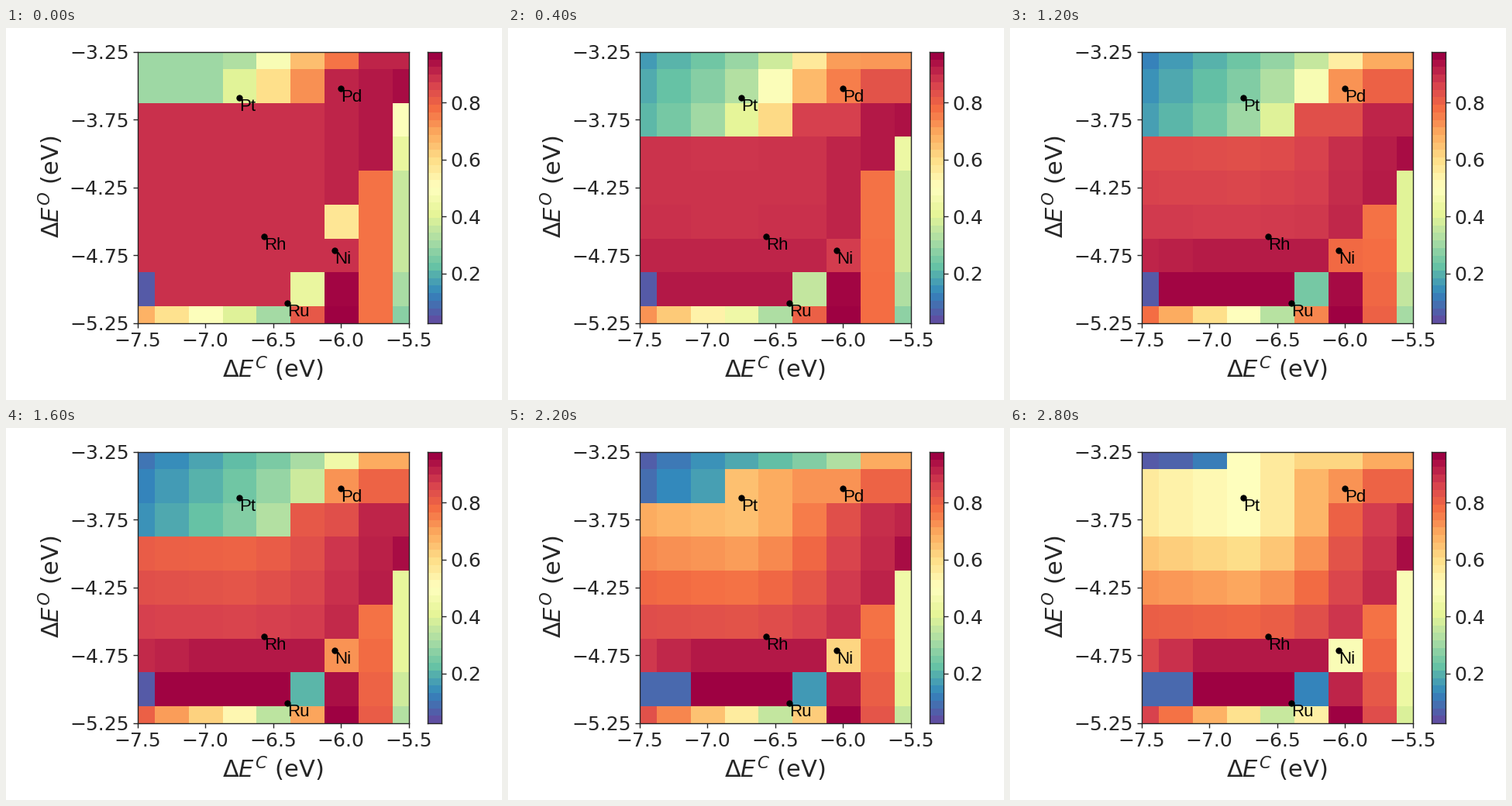
These frames come from a looping animation (640 by 480 pixels, 3000 ms). A matplotlib script:

```python
import numpy as np
import matplotlib.pyplot as plt
from matplotlib.animation import FuncAnimation

W, H, DPI = 640, 480, 100
FRAMES, STEP = 15, 200
N = 9
INK = "#262626"
LOW, HIGH = 0.0257, 0.978

plt.rcParams.update({
    "font.family": "DejaVu Sans",
    "mathtext.fontset": "dejavusans",
    "text.color": INK,
    "axes.edgecolor": INK,
    "axes.linewidth": 1.0,
    "xtick.color": INK,
    "ytick.color": INK,
})

row, col = np.mgrid[0:N, 0:N]


def plateau(t, u):
    """Red region: sags towards the upper left, deepens in lower rows."""
    base = 92 + 2 * np.maximum(col - 5, 0)
    rise = 4 * np.maximum(row - 5, 0) * (1 - np.exp(-t / 3))
    depth = 10.5 * np.clip(6 - row, 0, 4)
    sag = np.interp(col, [0, 3, 4, 6, 8], [0.85, 1, 0.85, 0.28, 0])
    droop = 4 * np.maximum(2 - col, 0) * (row == 6)
    cap = 70 + 12 * row - 8 * (col < 7) + 24 * np.exp(-t)
    return np.minimum(base + rise - (depth * sag + droop) * u**2, cap)


def basin(t):
    """Blue-green region: one profile sliding to the right."""
    s = np.maximum(col + 0.6 * row + 1.2 - 0.27 * t, 3.8 - 3 * t)
    return np.interp(s, [-2, 0, 3, 4.5, 6, 7, 9], [2, 11, 23, 33, 64, 77, 96])


def levels(t):
    """Cell levels at frame t, in percent of the colour scale."""
    u = t / (FRAMES - 1)
    z = plateau(t, u)

    # The basin is a wedge whose rows flip to the plateau from below.
    flip = 13.2 - 2.2 * row + (col < 3)
    wedge = (row < 2 + (t >= 1)) & (col < 7 - row) & (t < flip)
    z = np.where(wedge, basin(t), z)

    # Right-hand strips retreat downwards in steps.
    orange = (col == 7) & (row >= 4 + (t >= 3))
    z = np.where(orange, 79 + 2.5 * np.maximum(row - 5, 0) * u, z)
    green = (col == 8) & (row >= 2 + (t >= 1) + (t >= 6))
    z = np.where(green, 35 + 13 * u**1.3 - 5 * np.maximum(row - 6, 0)
                 + 7 * np.maximum(4 - row, 0), z)

    # Bottom row: a ramp that warms up on the left.
    ramp = 69 - 10 * col + 20 * u**0.7 * np.clip(4.3 - col, 0, 1)
    z = np.where((row == 8) & (col < 5), ramp, z)

    # Single cells and the blue pocket
    z[8, 5] = 84 - 29 * u**1.5
    z[8, 6] = 100
    z[7, 6] = 99 - 5 * u**2
    z[7, 5] = 42 * np.exp(-t / 9.5)
    z[6, 6] = 92 - 44 * u**1.6
    z[5, 6] -= 36 * np.exp(-4 * t)
    pocket = int(t >= 9)
    z[7, :1 + pocket] = 2 + 3 * pocket
    return z


fig = plt.figure(figsize=(W / DPI, H / DPI), dpi=DPI, facecolor="white")


def panel(left, right):
    top, bottom = 30.6, 380.6
    return fig.add_axes([left / W, 1 - bottom / H,
                         (right - left) / W, (bottom - top) / H])


def caption(x, y, text, **kw):
    fig.text(x / W, 1 - y / H, text, va="baseline", **kw)


ax = panel(169.7, 519.7)
heat = ax.imshow(levels(0), cmap="Spectral_r", vmin=0, vmax=100, aspect="auto",
                 interpolation="nearest",
                 extent=(-7.625, -5.375, -5.375, -3.125))
ax.set(xlim=(-7.5, -5.5), ylim=(-5.25, -3.25),
       xticks=np.arange(-7.5, -5.4, 0.5), yticks=np.arange(-5.25, -3.2, 0.5))
ax.xaxis.set_major_formatter("{x:.1f}")
ax.yaxis.set_major_formatter("{x:.2f}")

bar = panel(544, 562)
bar.imshow(np.linspace(0, 1, 36)[:, None], cmap="Spectral_r", aspect="auto",
           origin="lower", interpolation="nearest", extent=(0, 1, LOW, HIGH))
bar.set(xticks=[], yticks=[0.2, 0.4, 0.6, 0.8])
bar.yaxis.tick_right()
for a in (ax, bar):
    a.tick_params(labelsize=18, length=4.5, width=1, pad=3.5)

caption(344.3, 451, r"$\Delta E^C$ (eV)", size=22, ha="center")
caption(69, 205, r"$\Delta E^O$ (eV)", size=22, ha="center",
        rotation=90, rotation_mode="anchor")

metals = {"Pt": (301, 89.6), "Pd": (432, 77.6), "Rh": (333, 268.6),
          "Ni": (424, 286.6), "Ru": (363, 354.6)}
for name, (x, y) in metals.items():
    ax.plot(x, H - y, "o", color="black", ms=6, mew=0,
            transform=None, clip_on=False)
    caption(x, y + 17, name, size=16, color="black", family="Liberation Sans")


def draw(i):
    heat.set_data(levels(i))
    return [heat]


anim = FuncAnimation(fig, draw, frames=FRAMES, interval=STEP,
                     init_func=lambda: draw(0), repeat=True, repeat_delay=0)
plt.show()
```
